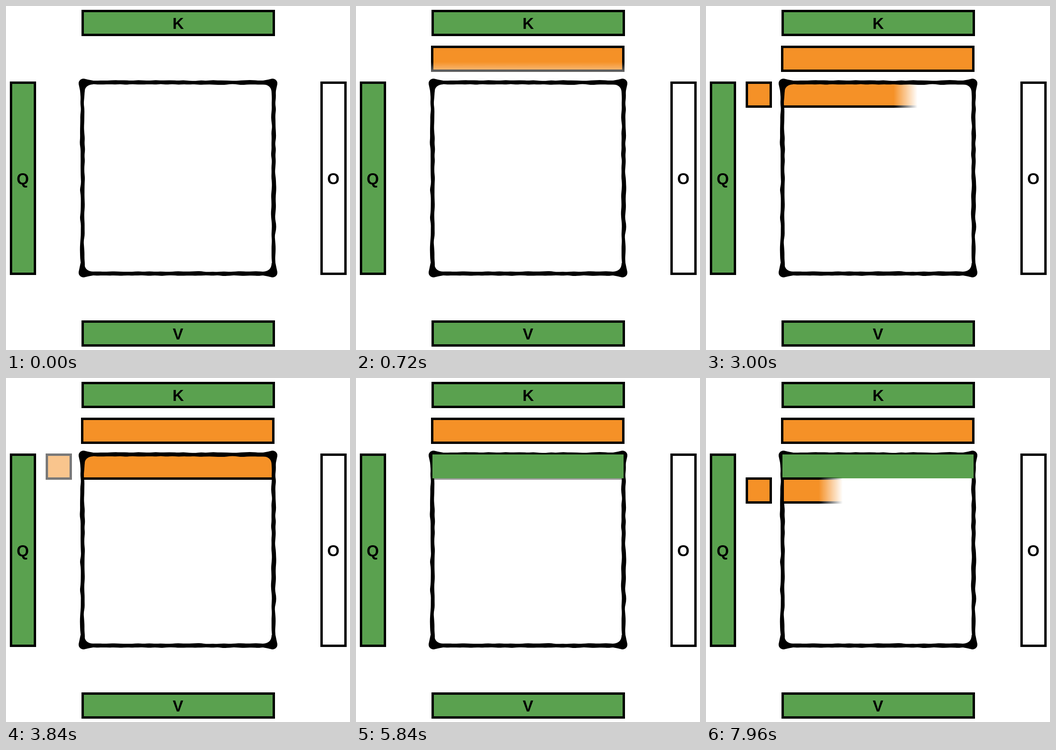
An HTML page that plays this animation: 720 px wide and 720 px high, repeating every 8 s.

```html
<!DOCTYPE html>
<html lang="en">
<head>
<meta charset="utf-8">
<title>Attention blocks</title>
<style>
  html, body { margin: 0; width: 100%; height: 100%; overflow: hidden; background: #fff; }
  svg { display: block; width: 100vw; height: 100vh; }
  text { font: bold 33px "Liberation Sans", Arial, sans-serif; text-anchor: middle; }
</style>
</head>
<body>
<svg id="stage" viewBox="0 0 720 720"></svg>
<script>
const NS = "http://www.w3.org/2000/svg";
const stage = document.getElementById("stage");
const GREEN = "#5aa14f", ORANGE = "#f59127";
const LOOP = 8000, STEP = 40;

function add(parent, tag, attrs) {
  const el = document.createElementNS(NS, tag);
  for (const k in attrs) el.setAttribute(k, attrs[k]);
  parent.appendChild(el);
  return el;
}

const defs = add(stage, "defs", {});

// Box given by its outer edges, with a 5px black border
function box(x, y, w, h, fill) {
  return add(stage, "rect", {
    x: x + 2.5, y: y + 2.5, width: w - 5, height: h - 5,
    fill, stroke: "#000", "stroke-width": 5
  });
}

function label(x, y, s) {
  add(stage, "text", { x, y }).textContent = s;
}

// Soft-edged wipe along one axis; returns a setter taking progress 0..1
let wipes = 0;
function wipe(el, axis, from, size, feather) {
  const id = "w" + wipes++;
  const grad = add(defs, "linearGradient", {
    id: id + "g", gradientUnits: "userSpaceOnUse", x1: 0, y1: 0, x2: 0, y2: 0
  });
  add(grad, "stop", { offset: 0, "stop-color": "#fff" });
  add(grad, "stop", { offset: 1, "stop-color": "#fff", "stop-opacity": 0 });
  const area = { x: 0, y: 0, width: 720, height: 720 };
  const mask = add(defs, "mask", { id, maskUnits: "userSpaceOnUse", ...area });
  add(mask, "rect", { ...area, fill: `url(#${id}g)` });
  return p => {
    el.style.display = p > 0 ? "" : "none";
    if (p >= 1) return el.removeAttribute("mask");
    const lead = from + p * (size + feather);
    grad.setAttribute(axis + "1", lead - feather);
    grad.setAttribute(axis + "2", lead);
    el.setAttribute("mask", `url(#${id})`);
  };
}

// Brush-drawn square
let seed = 11;
function rnd() {
  seed = (seed * 16807) % 2147483647;
  return seed / 2147483647 * 2 - 1;
}

function smooth(pts) {
  let d = "";
  for (let i = 0; i < pts.length - 1; i++) {
    const [a, b] = pts[i], [c, e] = pts[i + 1];
    d += `Q${a.toFixed(1)} ${b.toFixed(1)} ${((a + c) / 2).toFixed(1)} ${((b + e) / 2).toFixed(1)}`;
  }
  return d + "L" + pts[pts.length - 1].join(" ");
}

function brushSide(parent, pos, vertical) {
  const one = [], two = [];
  const drift = vertical ? 1 : 0.5;
  for (let s = 168; s <= 552; s += 12) {
    const mid = pos + rnd() * drift;
    const half = 4.2 + rnd() * 0.8;
    one.push(vertical ? [mid - half, s] : [s, mid - half]);
    two.unshift(vertical ? [mid + half, s] : [s, mid + half]);
  }
  add(parent, "path", { d: "M" + one[0].join(" ") + smooth(one) + "L" + two[0].join(" ") + smooth(two) + "Z" });
}

function brushFrame() {
  const g = add(stage, "g", { fill: "#000" });
  for (const pos of [160, 560]) {
    brushSide(g, pos, false);
    brushSide(g, pos, true);
  }
  const corner = "M152.2 164Q154 172 156 182L164 182Q164.500 165 182 164L182 156Q172 154.500 164 152.200A10 10 0 0 0 152.200 164Z";
  for (const sx of [1, -1]) for (const sy of [1, -1]) {
    add(g, "path", {
      d: corner,
      transform: `translate(${sx < 0 ? 720 : 0} ${sy < 0 ? 720 : 0}) scale(${sx} ${sy})`
    });
  }
}

box(158, 8, 405, 55, GREEN);
box(8, 158, 55, 405, GREEN);
box(158, 658, 405, 55, GREEN);
box(658, 158, 55, 405, "#fff");
label(360.5, 48, "K");
label(35, 372.5, "Q");
label(360, 698, "V");
label(685, 372.5, "O");

const keys = box(157, 83, 405, 55, ORANGE);
const query1 = box(83, 158, 55, 55, ORANGE);
const query2 = box(83, 208, 55, 55, ORANGE);
const row1 = box(158, 158, 405, 55, ORANGE);
brushFrame();
const done = add(stage, "rect", { x: 160, y: 160, width: 400, height: 50, fill: GREEN });
const row2 = box(158, 208, 405, 55, ORANGE);

// setter, start ms, duration ms
const reveals = [
  [wipe(keys, "y", 83, 55, 50), 80, 800],
  [wipe(query1, "x", 83, 55, 7), 1505, 850],
  [wipe(row1, "x", 158, 405, 50), 2418, 930],
  [wipe(done, "x", 160, 400, 50), 4342, 920],
  [wipe(query2, "x", 83, 55, 7), 6785, 850],
  [wipe(row2, "x", 158, 405, 50), 7698, 930]
];
const fades = [
  [query1, 3480, 740],
  [row1, 5400, 760]
];

const progress = (t, start, dur) => Math.min(1, Math.max(0, (t - start) / dur));
const ease = p => p * p * (3 - 2 * p);

function draw(t) {
  for (const [set, start, dur] of reveals) set(progress(t, start, dur));
  for (const [el, start, dur] of fades) {
    el.setAttribute("opacity", 1 - ease(progress(t, start, dur)));
  }
}

let origin = null;
function tick(now) {
  if (origin === null) origin = now;
  const t = (now - origin) % LOOP;
  draw(Math.floor(t / STEP) * STEP);
  requestAnimationFrame(tick);
}
draw(0);
requestAnimationFrame(tick);
</script>
</body>
</html>
```
